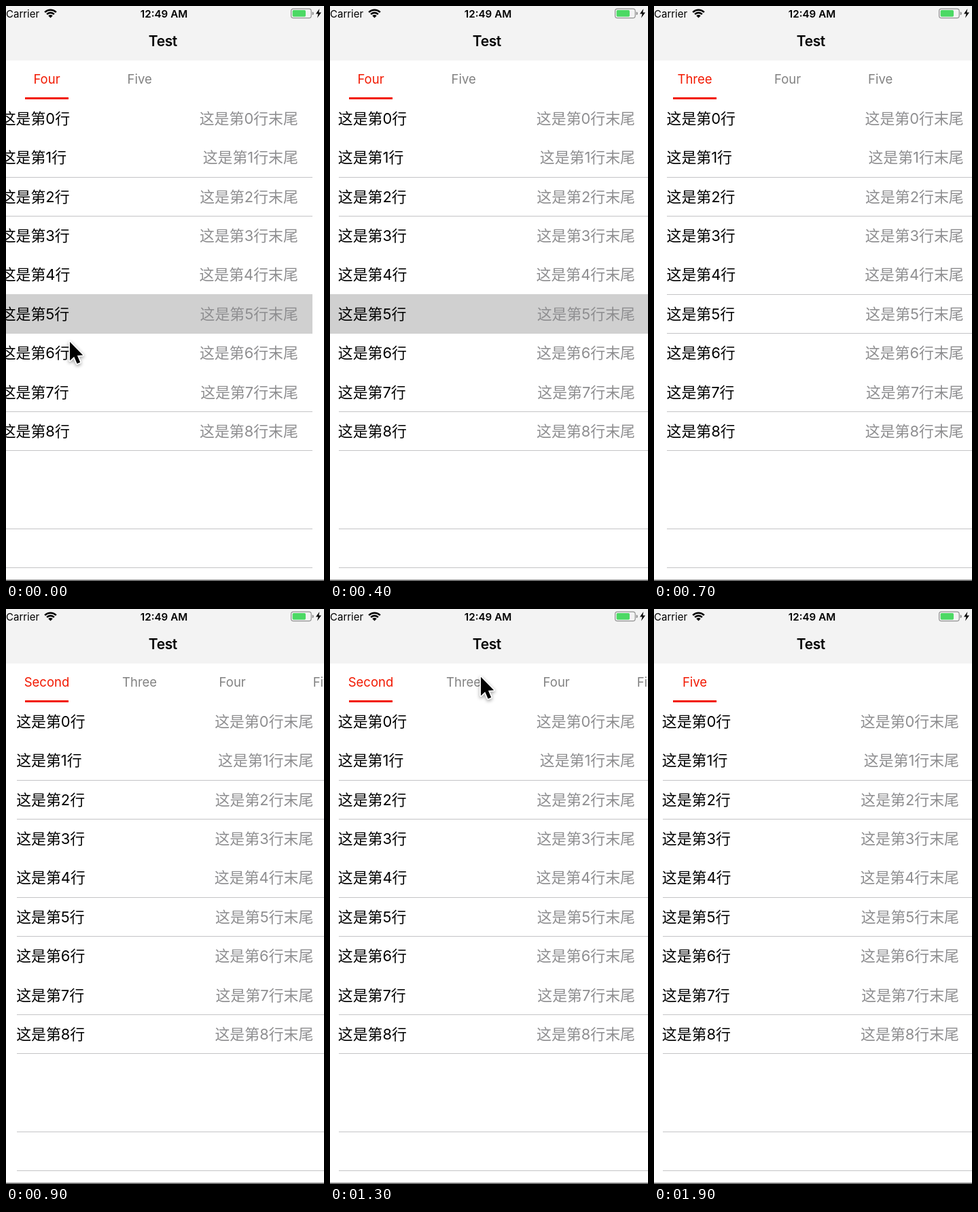
Animation of 468 by 844 pixels, one loop 2 s. Source, as an HTML page with a canvas:

```html
<!DOCTYPE html>
<html lang="zh-CN">
<head>
<meta charset="utf-8">
<title>Test</title>
<style>
html, body { margin: 0; width: 100%; height: 100%; overflow: hidden; background: #fff; }
canvas { display: block; width: 468px; height: 844px; }
</style>
</head>
<body>
<canvas id="stage" width="468" height="844"></canvas>
<script>
const ctx = document.getElementById('stage').getContext('2d');
const W = 468, H = 844, LOOP = 2000, STEP = 100;
const PAGE = 478, REST = -8, INSET = 20.5;
const ROW_TOP = 136.5, ROW_H = 57.3, ROWS = 9;
const TABS = ['First', 'Second', 'Three', 'Four', 'Five'];
const SELECTED_PAGE = 3, SELECTED_ROW = 5;
const FONT = 'Inter, "Noto Sans CJK SC", "Noto Sans CJK", sans-serif';

// Swipes forward, then back to the first page, then steady taps to the last.
const SWIPES = [
  { t: 0, page: 3.04 }, { t: 200, page: 3.983 }, { t: 300, page: 4 },
  { t: 400, page: 3 }, { t: 500, page: 2.575 }, { t: 700, page: 1.986 },
  { t: 1100, page: 0 }, { t: 1900, page: 4 }
];

// The pointer shows only during these spans and glides from one end to the other.
const GLIDES = [
  { start: 0, end: 0, from: [94, 493], to: [94, 493] },
  { start: 500, end: 500, from: [350, 418], to: [350, 418] },
  { start: 1100, end: 1800, from: [232, 96], to: [197, 109] }
];

const mix = (a, b, k) => a + (b - a) * k;

function pagerAt(t) {
  const i = SWIPES.findIndex(s => s.t > t);
  const a = SWIPES.at(i < 0 ? -2 : i - 1), b = SWIPES.at(i);
  const page = mix(a.page, b.page, (t - a.t) / (b.t - a.t));
  // The tab follows only once the pager has reached the next page.
  const tab = b.page > a.page ? Math.floor(page) : Math.ceil(page);
  return { page, tab };
}

function pointerAt(t) {
  const g = GLIDES.find(g => t >= g.start && t <= g.end);
  if (!g) return null;
  const k = (t - g.start) / (g.end - g.start || 1);
  return g.from.map((v, i) => mix(v, g.to[i], k));
}

function text(str, x, y, size, color, align = 'left', weight = 400, spacing = 0) {
  ctx.font = `${weight} ${size}px ${FONT}`;
  ctx.letterSpacing = spacing + 'px';
  ctx.textAlign = align;
  ctx.fillStyle = color;
  ctx.fillText(str, x, y);
}

function box(x, y, w, h, color) {
  ctx.fillStyle = color;
  ctx.fillRect(x, y, w, h);
}

function polygon(x, y, points) {
  ctx.beginPath();
  points.forEach(([px, py]) => ctx.lineTo(x + px, y + py));
  ctx.closePath();
}

function drawPage(index, left) {
  for (let k = 0; k < 12; k++) {
    if (k % 3) {
      const y = Math.round(ROW_TOP + ROW_H * (k + 1));
      const x = Math.round(left + INSET);
      box(x, y, Math.round(left + PAGE) - x, 1, '#c4c4c6');
    }
  }
  if (index === SELECTED_PAGE) {
    box(Math.round(left), Math.round(ROW_TOP + ROW_H * SELECTED_ROW), PAGE, 58, '#d0d0d0');
  }
  for (let k = 0; k < ROWS; k++) {
    const y = 173 + k * 57.37;
    text(`这是第${k}行`, left + INSET - 0.7, y, 21.9, '#000');
    text(`这是第${k}行末尾`, left + PAGE - 21, y, 21.9, '#8e8e90', 'right');
  }
}

function drawTabs(active) {
  box(0, 80, W, 57, '#fff');
  TABS.forEach((name, i) => {
    const x = 60 + (i - active) * 136.6;
    text(name, x, 114, 18.5, i === active ? '#f21800' : '#818181', 'center');
  });
  box(28, 134, 64, 3, '#f21800');
}

function drawWifi() {
  const x = 65.5, y = 17.5, a = -Math.PI * 0.75, b = -Math.PI * 0.25;
  ctx.strokeStyle = ctx.fillStyle = '#000';
  ctx.lineWidth = 2.6;
  for (const r of [11.8, 7.6]) {
    ctx.beginPath();
    ctx.arc(x, y, r, a, b);
    ctx.stroke();
  }
  ctx.beginPath();
  ctx.moveTo(x, y);
  ctx.arc(x, y, 4.6, a, b);
  ctx.fill();
}

function drawBattery() {
  ctx.strokeStyle = '#929292';
  ctx.lineWidth = 1.2;
  ctx.beginPath();
  ctx.roundRect(419.6, 4.1, 29.6, 13.6, 3.4);
  ctx.stroke();
  ctx.fillStyle = '#4cd964';
  ctx.beginPath();
  ctx.roundRect(421.6, 6.1, 19.4, 9.6, 1.6);
  ctx.fill();
  ctx.fillStyle = '#929292';
  ctx.beginPath();
  ctx.arc(450.6, 10.9, 2.4, -Math.PI / 2, Math.PI / 2);
  ctx.fill();
  polygon(456, 4, [[5.4, 0], [0, 7.6], [3.6, 7.6], [2, 13.6], [8, 5.6], [4.3, 5.6]]);
  ctx.fillStyle = '#000';
  ctx.fill();
}

function drawHeader() {
  box(0, 0, W, 80, '#f3f3f3');
  text('Carrier', 0, 17, 15, '#000');
  text('12:49 AM', 232.5, 17, 15.2, '#000', 'center', 600);
  text('Test', 230.8, 59, 21, '#000', 'center', 600, -0.4);
  drawWifi();
  drawBattery();
}

function drawPointer(x, y) {
  ctx.save();
  polygon(x, y, [[0, 0], [0, 27.5], [6.2, 21.8], [10.6, 32], [15.2, 30], [10.9, 20], [19.2, 19.5]]);
  ctx.lineJoin = 'round';
  ctx.lineWidth = 3.4;
  ctx.strokeStyle = '#fff';
  ctx.shadowColor = 'rgba(0,0,0,.4)';
  ctx.shadowBlur = 5;
  ctx.shadowOffsetY = 2;
  ctx.stroke();
  ctx.shadowColor = 'transparent';
  ctx.fillStyle = '#000';
  ctx.fill();
  ctx.restore();
}

function draw(now) {
  const t = Math.floor(now % LOOP / STEP) * STEP;
  const { page, tab } = pagerAt(t);
  const pointer = pointerAt(t);
  box(0, 0, W, H, '#fff');
  TABS.forEach((_, i) => {
    const left = REST + (i - page) * PAGE;
    if (left < W && left + PAGE > 0) drawPage(i, left);
  });
  drawTabs(tab);
  drawHeader();
  box(0, 842, W, 2, '#777');
  if (pointer) drawPointer(...pointer);
}

function loop() {
  draw(performance.now());
  requestAnimationFrame(loop);
}
loop();
</script>
</body>
</html>
```
